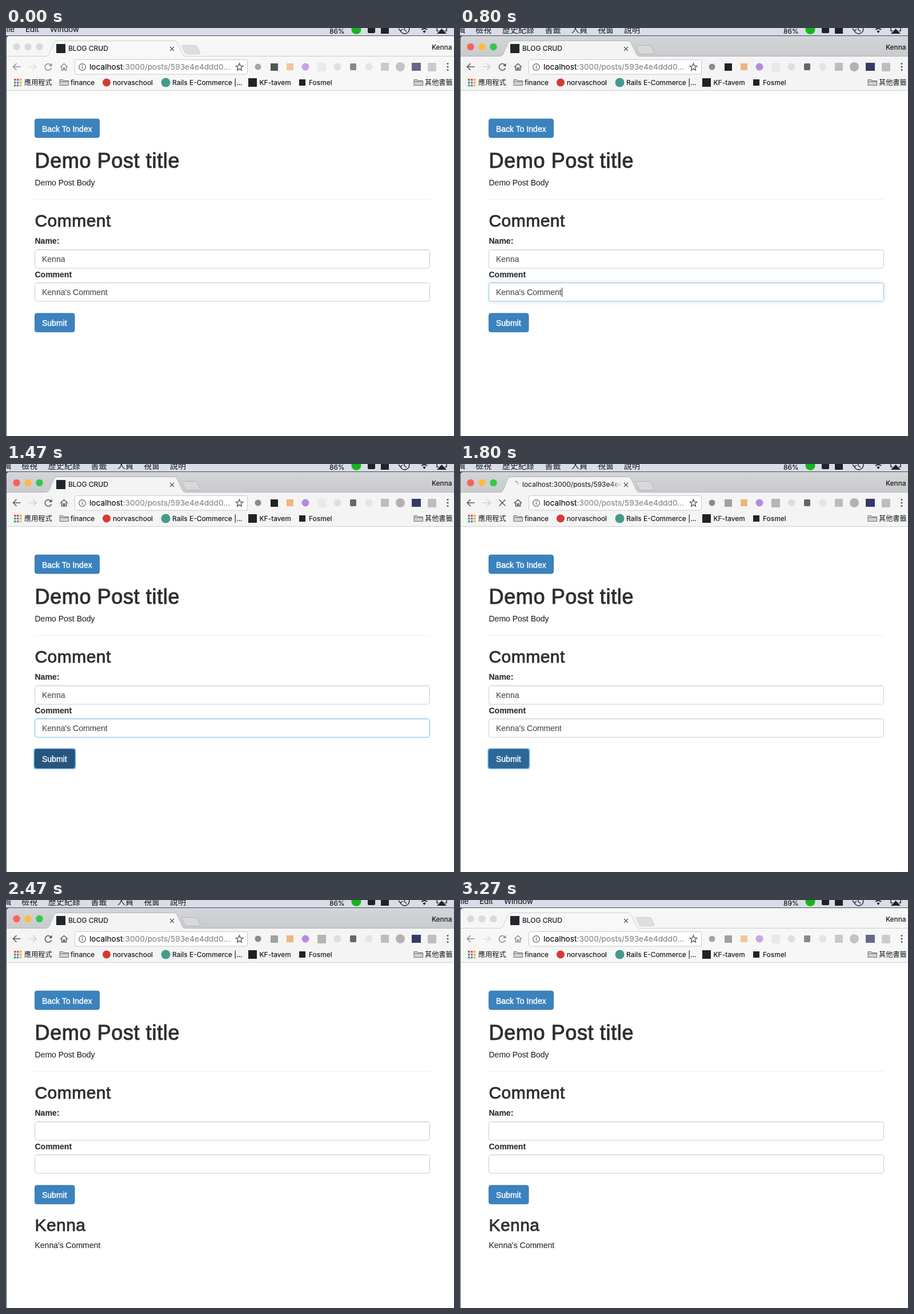
Write an HTML page that moves like this. It is 784 px wide and 715 px high and loops after 3.34 s.

```html
<!DOCTYPE html>
<html lang="en">
<head>
<meta charset="utf-8">
<title>Blog comment demo</title>
<style>
  html, body { margin: 0; width: 100%; height: 100%; overflow: hidden; background: #fff; }
  svg { display: block; width: 784px; height: 715px; }
  text { white-space: pre; }
  .ui { font: 12px Inter, "Noto Sans CJK TC", "Noto Sans CJK", sans-serif; fill: #111; stroke: #111; stroke-width: .15px; }
  .menu { font-size: 13.3px; fill: #15171c; }
  .url { font-size: 13.7px; }
  .rest { fill: #888; stroke: #888; }
  .cjk { font: 14px "Noto Sans CJK TC", "Noto Sans CJK", sans-serif; fill: #15171c; }
  .small { font-size: 12.2px; }
  .page { font: 14px "Liberation Sans", Arial, sans-serif; fill: #2e2e2e; stroke: #2e2e2e; stroke-width: .15px; }
  .label { font-weight: bold; }
  .value { fill: #505050; stroke: #505050; }
  .h1 { font-size: 36px; letter-spacing: .63px; stroke-width: 1px; }
  .h2 { font-size: 30px; letter-spacing: .45px; stroke-width: .85px; }
  .btn { fill: #fff; stroke: #fff; stroke-width: .4px; }
  .line { fill: none; stroke: #5a5a5a; stroke-width: 1.6; }
</style>
</head>
<body>
<svg id="stage" viewBox="0 0 784 715"></svg>
<script>
const LOOP = 3340;
const ACTIVATE = 730, HOVER = 1270, PRESS = 1430, RELEASE = 1600;
const LOAD = 1670, LOADED = 2270, DEACTIVATE = 3270;
const FADE = 150;

const text = (x, y, s, cls, extra = '') => `<text x="${x}" y="${y}" class="${cls}" ${extra}>${s}</text>`;
const rect = (x, y, w, h, fill, extra = '') =>
  `<rect x="${x}" y="${y}" width="${w}" height="${h}" fill="${fill}" ${extra}/>`;
const circle = (x, y, r, fill, extra = '') => `<circle cx="${x}" cy="${y}" r="${r}" fill="${fill}" ${extra}/>`;
const path = (d, extra = 'class="line"') => `<path d="${d}" ${extra}/>`;
const group = (id, body) => `<g id="${id}">${body}</g>`;

const folder = x => path(`M${x} 100.5V90.5h5.5l1.5 2h8.5v8zM${x} 94h15.5`,
  'fill="#d2d2d2" stroke="#707070"');

function menuBar() {
  const chinese = [[-5, '輯'], [27, '檢視'], [74, '歷史紀錄'], [148.5, '書籤'],
    [195, '人員'], [241, '視窗'], [287, '說明']];
  const english = [[-7, 'File'], [34, 'Edit'], [77, 'Window']];
  return rect(0, 0, 784, 13, '#d8dde7') + rect(0, 13, 784, 12, '#454b59')
    + group('menuOn', chinese.map(([x, s]) => text(x, 7.5, s, 'cjk')).join(''))
    + group('menuOff', english.map(([x, s]) => text(x, 7, s, 'ui menu')).join(''))
    + text(566, 10, '', 'ui', 'id="battery"')
    + circle(613, 2.5, 8.5, '#16b51c')
    + rect(633, -4, 13, 13, '#202226', 'rx="2"')
    + rect(656, -4, 14, 14, '#202226')
    + path('M690 4A8 8 0 1 0 697-6M697-2V3l4 3M687 1l3 4 4-3', 'fill="none" stroke="#202226" stroke-width="1.4"')
    + path('M724 0Q732-6 740 0M727 3Q732-1 737 3', 'fill="none" stroke="#202226" stroke-width="1.8"')
    + path('M729.3 5.5Q732 3.5 734.7 5.5L732 9z', 'fill="#202226"')
    + path('M757 5h-3V-5h17V5h-3', 'fill="none" stroke="#202226" stroke-width="1.4"')
    + path('M754 10h17l-8.5-9z', 'fill="#202226"');
}

function tabStrip() {
  return path('M1 52V19q0-5 5-5H784V52z', 'id="strip"')
    + [18.5, 38.5, 58.5].map((x, i) => circle(x, 33, 6.2, '#ddd', `id="light${i}"`)).join('')
    + path('M1 49.5H69C74.5 49.5 75.5 46 78 40L83.5 27Q85.5 22.5 90 22.5H293Q298 22.5 300 27L306 40C309 47 310 49.5 316 49.5H784V52H1z',
      'id="tab"')
    + path('M309 30.5H331Q334 30.5 335 33L340 44Q340 45.5 338 45.5H317Q314 45.5 313 43L308 32Q307.5 30.5 309 30.5z', 'id="newTab"')
    + group('tabIdle', rect(88, 28, 16, 16, '#20262b') + text(109, 40.3, 'BLOG CRUD', 'ui'))
    + group('tabBusy', path('M96 30A6 6 0 0 1 102 36', 'id="spinner" fill="none" stroke="#9a9a9a" stroke-width="1.5"')
      + text(109, 40.3, 'localhost:3000/posts/593e4e4', 'ui', 'style="fill:url(#fade);stroke:none"'))
    + path('M287 33l7 7M294 33l-7 7', 'fill="none" stroke="#555" stroke-width="1.3"')
    + text(745, 38, 'Kenna', 'ui');
}

function toolbar() {
  const star = Array.from({ length: 10 }, (_, i) => {
    const a = i * Math.PI / 5 - Math.PI / 2, r = i % 2 ? 2.9 : 6.6;
    return (408.5 + r * Math.cos(a)).toFixed(2) + ' ' + (68.7 + r * Math.sin(a)).toFixed(2);
  }).join('L');
  const vivid = circle(441, 68, 5.5, '#8a8a8a') + rect(491, 62, 12, 12, '#efb57b')
    + circle(524, 68, 6.5, '#b38ce0') + rect(602, 62, 11, 12, '#666', 'rx="2"')
    + rect(656, 61, 14, 14, '#bcbcbc', 'rx="1"') + circle(690, 68, 8, '#b2b2b2')
    + rect(710, 61, 16, 14, '#34396a') + rect(738, 61, 15, 15, '#bdbdbd', 'rx="2"');
  return rect(1, 50, 783, 59, '#f4f4f4', 'id="bar"') + rect(1, 109, 783, 1, '#d0d0d0')
    + group('nav', path('M25.5 68H13M18.5 62l-6 6 6 6')
      + path('M40 68H52.5M47 62l6 6-6 6', 'fill="none" stroke="#cfcfcf" stroke-width="1.6"')
      + group('reload', path('M79 65.5A5.7 5.7 0 1 0 79.5 70') + path('M80.5 61.5v5.5H75z', 'fill="#5a5a5a"'))
      + group('stop', path('M68.5 62.5l11 11M79.5 62.5l-11 11'))
      + path('M95 68.5l6.5-6 6.5 6M97.5 67.5v6.2h3v-4h2v4h3v-6.2'))
    + rect(120.5, 55.5, 302, 25.5, '#fff', 'rx="3" stroke="#c9c9c9"')
    + circle(133.5, 68.5, 5.8, 'none', 'stroke="#666" stroke-width="1.3"')
    + path('M133.5 67.5v4M133.5 65v1.4', 'stroke="#666" stroke-width="1.4"')
    + text(146, 73.3, 'localhost<tspan class="rest">:3000/posts/593e4e4ddd0...</tspan>', 'ui url')
    + path('M' + star + 'z', 'fill="none" stroke="#555" stroke-width="1.3"')
    + group('vivid', vivid)
    + rect(463, 62, 13, 13, '#555', 'id="fontIcon"') + rect(545, 61, 15, 15, '#e9e9e9', 'id="stackIcon"')
    + circle(580, 68, 6.5, '#dedede') + circle(635, 68, 6.5, '#e4e4e4')
    + [62.5, 68, 73.5].map(y => circle(773, y, 1.6, '#5a5a5a')).join('');
}

function bookmarks() {
  const dots = ['#e0493d', '#e0493d', '#eda63a', '#4a9e58', '#4a82d8', '#eda63a', '#4a9e58', '#4a82d8', '#edbd3a'];
  return dots.map((c, i) => rect(14 + i % 3 * 5, 89 + Math.floor(i / 3) * 5, 3.4, 3.4, c)).join('')
    + text(32, 100, '應用程式', 'cjk small') + folder(94) + text(113, 100, 'finance', 'ui')
    + circle(176, 95.5, 7, '#d23b36') + text(187, 100, 'norvaschool', 'ui')
    + circle(279.5, 95.5, 8, '#459a8b') + text(291, 100, 'Rails E-Commerce |...', 'ui')
    + rect(424, 88, 15, 15, '#222') + text(443.5, 100, 'KF-tavem', 'ui')
    + rect(513, 90, 11, 11, '#222') + text(530, 100, 'Fosmel', 'ui')
    + folder(714) + text(733, 100, '其他書籤', 'cjk small');
}

const button = (y, w, s, id) => rect(50.5, y - .2, w, 32.7, '#3b82be', `id="${id}" rx="3.5" stroke="#3878b0"`)
  + text(63, y + 22, s, 'page btn');

const field = (y, id) => rect(50.5, y + .5, 691, 32.5, '#fff', `id="${id}" rx="4" stroke="#ccc"`)
  + rect(53, y + 1, 686, 1, '#f1f1f1');

function pageBody() {
  return rect(1, 110, 783, 605, '#fff') + button(159.5, 113, 'Back To Index', 'back')
    + text(50.5, 245, 'Demo Post title', 'page h1') + text(50.5, 276, 'Demo Post Body', 'page')
    + rect(50, 300, 692, 1, '#eee') + text(50.5, 348, 'Comment', 'page h2')
    + text(50.5, 378, 'Name:', 'page label') + field(388, 'nameBox')
    + text(50.5, 436.7, 'Comment', 'page label')
    + rect(50, 446, 692, 34, '#66afe9', 'id="glow" rx="4" filter="url(#blur)"') + field(446, 'commentBox')
    + group('values', text(63, 410, 'Kenna', 'page value') + text(63, 468, "Kenna's Comment", 'page value'))
    + rect(178, 455, 1, 16, '#222', 'id="caret"')
    + rect(48.3, 498.2, 74, 36.6, '#6cb2f7', 'id="ring" rx="4" filter="url(#soft)"')
    + button(500.2, 69.5, 'Submit', 'submit')
    + group('posted', text(50.5, 580, 'Kenna', 'page h2') + text(50.5, 610, "Kenna's Comment", 'page'));
}

document.getElementById('stage').innerHTML = `<defs>
  <filter id="blur" x="-5%" y="-60%" width="110%" height="220%"><feGaussianBlur stdDeviation="4"/></filter>
  <filter id="soft" x="-20%" y="-30%" width="140%" height="160%"><feGaussianBlur stdDeviation=".5"/></filter>
  <linearGradient id="fade" gradientUnits="userSpaceOnUse" x1="262" x2="284" y1="0" y2="0">
    <stop stop-color="#111"/><stop offset="1" stop-color="#111" stop-opacity="0"/></linearGradient>
  <linearGradient id="steel" x2="0" y2="1"><stop stop-color="#d3d5d8"/><stop offset="1" stop-color="#c8cacd"/></linearGradient>
</defs>` + menuBar() + tabStrip() + toolbar() + bookmarks() + pageBody() + rect(0, 13, 1, 702, '#454b59');

const el = id => document.getElementById(id);
const show = (id, on) => el(id).setAttribute('visibility', on ? 'visible' : 'hidden');
const set = (id, attrs) => { for (const k in attrs) el(id).setAttribute(k, attrs[k]); };
const within = (t, a, b) => t >= a && t < b;
const ease = p => { p = Math.max(0, Math.min(1, p)); return p * p * (3 - 2 * p); };
const mix = (a, b, p) => `rgb(${a.map((v, i) => Math.round(v + (b[i] - v) * p))})`;

function update(t) {
  const active = within(t, ACTIVATE, DEACTIVATE);
  const busy = within(t, LOAD, LOADED);
  const done = t >= LOADED;
  const typing = within(t, ACTIVATE, PRESS);
  const pressed = within(t, PRESS, RELEASE);

  show('menuOn', active);
  show('menuOff', !active);
  el('battery').textContent = t >= DEACTIVATE ? '89%' : '86%';
  set('strip', { fill: active ? 'url(#steel)' : '#f6f6f6' });
  set('tab', { fill: active ? '#f4f4f4' : '#f8f8f8', stroke: active ? '#b2b4b6' : '#cdcdcd' });
  set('newTab', { fill: active ? '#d8d9db' : '#dedede', stroke: active ? '#b2b4b6' : '#cecece' });
  set('bar', { fill: active ? '#f4f4f4' : '#f7f7f7' });
  ['#fc605b', '#fdbc40', '#34c84a'].forEach((c, i) => set('light' + i, { fill: active ? c : '#dadada' }));
  set('nav', { opacity: active ? 1 : .65 });
  set('vivid', { opacity: active ? 1 : .75 });
  set('fontIcon', { fill: t >= LOAD ? '#a0a0a0' : active ? '#222' : '#555' });
  set('stackIcon', { fill: active && t >= LOAD ? '#b5b5b5' : '#e9e9e9' });

  show('tabIdle', !busy);
  show('tabBusy', busy);
  show('reload', !busy);
  show('stop', busy);
  set('spinner', { transform: `rotate(${(t - 1800) * .36} 96 36)` });

  const focus = typing ? ease((t - ACTIVATE) / FADE) : t >= PRESS ? 1 - ease((t - PRESS) / FADE) : 0;
  set('commentBox', { stroke: mix([204, 204, 204], [102, 175, 233], focus) });
  set('glow', { opacity: typing ? focus * .6 : 0 });
  show('caret', typing && (t - ACTIVATE) % 1000 < 500);

  const focused = within(t, PRESS, LOADED);
  show('ring', focused);
  const dark = focused || within(t, HOVER, PRESS);
  set('submit', {
    fill: pressed ? '#25557f' : dark ? '#2d6797' : '#3b82be',
    stroke: pressed ? '#1d4568' : dark ? '#255983' : '#3878b0'
  });
  show('values', !done);
  show('posted', done);
}

const start = performance.now();
function tick() {
  update((performance.now() - start) % LOOP);
  requestAnimationFrame(tick);
}
tick();
</script>
</body>
</html>
```
